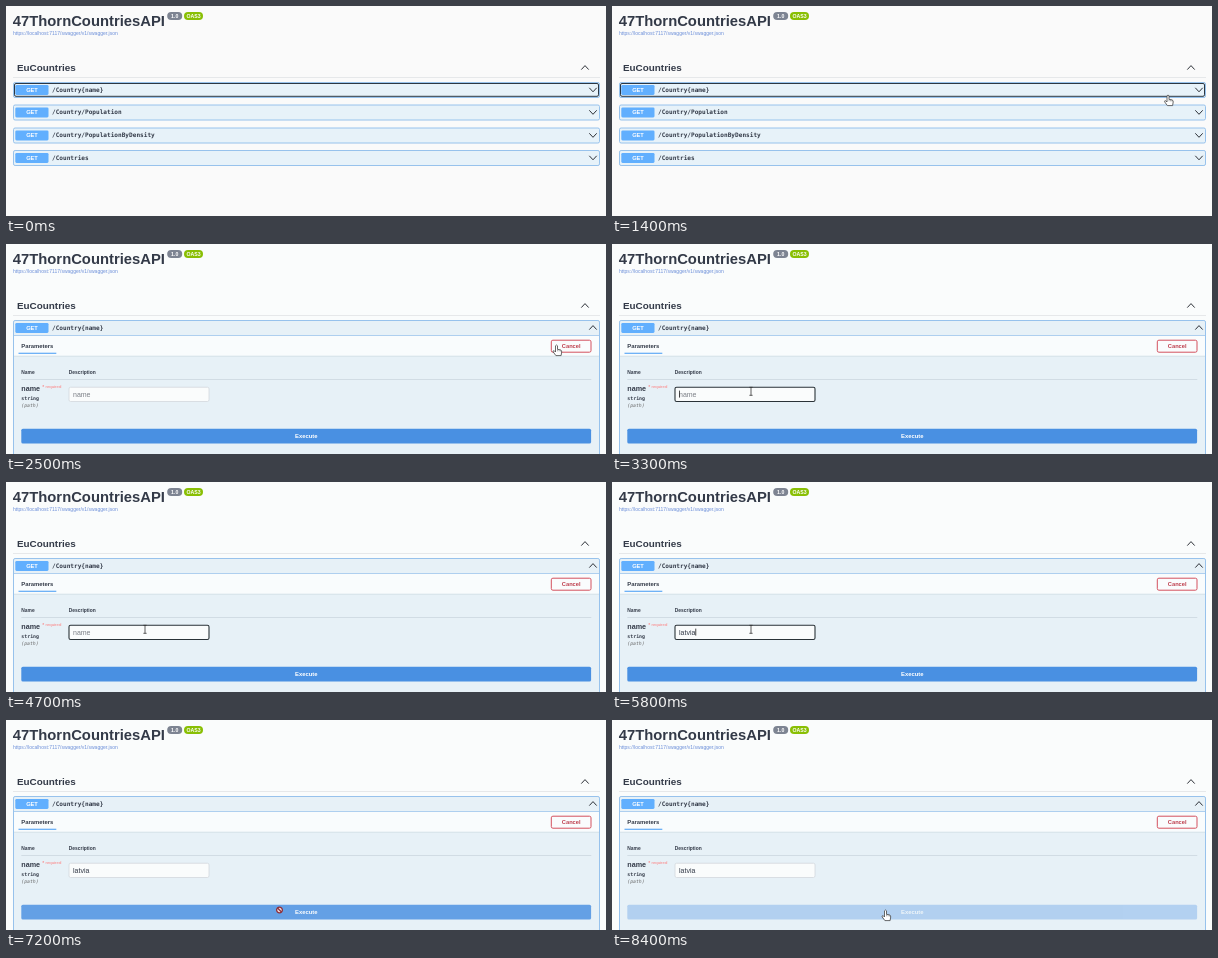
Animation of 600x210 px, one loop 8500 ms. Source, as an HTML page:

```html
<!DOCTYPE html>
<html lang="en">
<head>
<meta charset="utf-8">
<title>Countries API</title>
<style>
  html, body { margin: 0; width: 100%; height: 100%; overflow: hidden; background: #fafafa; }
  svg { display: block; width: 600px; height: 210px; }
  text { font-family: "Liberation Sans", Arial, sans-serif; fill: #333a48; white-space: pre; }
  .bold { font-weight: bold; }
  .mono { font-family: "DejaVu Sans Mono", monospace; }
  .mid { text-anchor: middle; }
  .white { fill: #fff; }
  .chevron { fill: none; stroke: #2d3138; stroke-width: 1; }
</style>
</head>
<body>
<svg id="stage" viewBox="0 0 600 210"></svg>
<script>
const LOOP = 8500, STEP = 100;
const stage = document.getElementById("stage");

const label = (x, y, size, text, cls = "bold", extra = "") =>
  `<text x="${x}" y="${y}" font-size="${size}" class="${cls}" ${extra}>${text}</text>`;
const box = (x, y, w, h, r, fill, stroke = "none", extra = "") =>
  `<rect x="${x}" y="${y}" width="${w}" height="${h}" rx="${r}" fill="${fill}" stroke="${stroke}" ${extra}/>`;
const chevron = (x, y, up) =>
  `<path class="chevron" d="M${x - 3.7} ${y + (up ? 2 : -2)}l3.7 ${up ? -4 : 4} 3.7 ${up ? 4 : -4}"/>`;
const group = (id, content) => `<g id="${id}">${content}</g>`;

const rowHead = (y, path) =>
  box(9.3, y + 2.9, 33.2, 10, 1.3, "#61affe") +
  label(26, y + 9.8, 5.7, "GET", "bold mid white") +
  label(46, y + 9.5, 6.1, path, "bold mono");
const row = (y, path) =>
  box(7.5, y + .5, 586, 15, 1.6, "#e7f2f9", "#97c2ec") +
  rowHead(y, path) + chevron(587, y + 7.8, false);
const sectionBar = (y, h) =>
  box(8, y, 585, h, 0, "#f9fcfd") +
  box(8, y + h, 585, .8, 0, "#d3dfe6");

const header =
  label(6.8, 20, 14.8, "47ThornCountriesAPI") +
  box(161.2, 6, 15, 8, 4, "#7d8492") +
  label(168.7, 12.1, 5.2, "1.0", "bold mid white") +
  box(178, 6, 19, 8, 4, "#89bf04") +
  label(187.5, 12.1, 5.2, "OAS3", "bold mid white") +
  label(7, 29.2, 5.02, "https://localhost:7117/swagger/v1/swagger.json", "", 'style="fill:#6c8fd9"') +
  label(11, 65.2, 9.9, "EuCountries") +
  chevron(579, 61.6, true) +
  box(7, 71.3, 587, .6, 0, "#d9dce0");

const collapsed =
  row(76, "/Country{name}") +
  row(98.5, "/Country/Population") +
  row(121.5, "/Country/PopulationByDensity") +
  row(144, "/Countries");

const expanded =
  box(7.5, 76.5, 586, 150, 1.6, "#e7f1f7", "#97c2ec") +
  rowHead(76, "/Country{name}") +
  chevron(587, 83.6, true) +
  box(8, 91.3, 585, .7, 0, "#97c2ec") +
  sectionBar(92, 19.8) +
  label(15.3, 104.2, 5.9, "Parameters") +
  box(12.5, 108.7, 37.8, 1.2, 0, "#61aaf5") +
  label(15.3, 129.8, 4.9, "Name") +
  label(62.8, 129.8, 4.9, "Description") +
  box(15.3, 135.3, 570, .6, 0, "#c3ced9") +
  label(15.3, 146.5, 7.2, "name") +
  label(36.3, 145.3, 5, "*", "", 'style="fill:#f66"') +
  label(39.5, 144.1, 4.3, "required", "", 'style="fill:#f77"') +
  label(15.3, 155.8, 4.9, "string", "bold mono") +
  label(15.3, 163, 4.8, "(path)", "mono", 'font-style="italic" style="fill:#666"') +
  box(63, 143.2, 140, 14.3, 1.6, "#fafcfc", "#d3d8dd", 'id="field"') +
  label(67, 152.9, 7, "", "", 'id="entry"') +
  box(67, 146.6, .8, 7, 0, "#222", "none", 'id="caret"');

const tryOut =
  box(540, 96.2, 45, 12, 1.6, "#fafcfd", "#555b66") +
  label(562.5, 104.2, 6.1, "Try it out", "bold mid") +
  sectionBar(193, 30) +
  label(15.3, 205.5, 5.9, "Responses");

const editing =
  box(545.3, 96.2, 39.7, 12, 1.6, "#fafcfd", "#d4505e") +
  label(565.2, 104.2, 5.7, "Cancel", "bold mid", 'style="fill:#bd3c4b"') +
  group("execute",
    box(15.3, 184.7, 569.8, 14.8, 1.6, "#4990e2") +
    label(300.3, 194.3, 5.9, "Execute", "bold mid white"));

// Each pointer is drawn with its hot spot at 0,0.
const pointers = {
  hand: '<path fill="#fff" stroke="#444" stroke-width=".8" stroke-linejoin="round" d="M-1 .8Q0-.8 1 .8V4.3L4 4.9Q5.4 5.3 5.2 7L4.6 10.6H-.6L-3.4 6.8Q-3.6 5.4-2.2 5.8L-1 7Z"/><path stroke="#666" stroke-width=".5" d="M1 4.3V6.3M2.6 4.7V6.4M4 5V6.5"/>',
  arrow: '<path fill="#fff" stroke="#222" stroke-width=".7" d="M0 0V8.6L2 6.8 3.3 9.8 4.6 9.2 3.3 6.3H6Z"/>',
  beam: '<path fill="none" stroke="#333" stroke-width=".8" d="M-1.6-4H1.6M0-4V4M-1.6 4H1.6"/>',
  ban: '<circle r="2.9" fill="#f3dede" stroke="#8c2f3b" stroke-width="1.3"/><path stroke="#8c2f3b" stroke-width="1.2" d="M-2-2L2 2"/>'
};

stage.innerHTML = box(0, 0, 600, 210, 0, "#fafafa", "none", 'id="page"') + header +
  group("collapsed", collapsed) + group("expanded", expanded) +
  group("tryOut", tryOut) + group("editing", editing) +
  box(8.5, 77.5, 584, 12.8, 1.5, "none", "#2b3743", 'id="focus"') +
  group("pointer", Object.entries(pointers).map(([id, art]) => group(id, art)).join(""));

const el = Object.fromEntries([...stage.querySelectorAll("[id]")].map(node => [node.id, node]));
const show = (node, on) => node.setAttribute("display", on ? "inline" : "none");
const clamp = v => Math.max(0, Math.min(1, v));
const ease = v => v * v * (3 - 2 * v);

// time, x, y of the pointer
const route = [
  [600, 572, -14], [1400, 556, 89], [1600, 553, 86.5], [1900, 553, 86.5],
  [2200, 550.5, 101], [2600, 550.5, 101], [3200, 139, 147.3],
  [6300, 139, 147.3], [6900, 273.5, 190], [LOOP, 273.5, 190]
];
const kinds = [
  [0, "arrow"], [1300, "hand"], [2000, "arrow"], [2100, "hand"], [2700, "arrow"],
  [3100, "beam"], [6400, "arrow"], [6900, "hand"], [7100, "ban"], [8400, "hand"]
];
const typed = [[0, ""], [5100, "l"], [5200, "la"], [5600, "lat"], [5700, "latv"], [5800, "latvia"]];
const CARET_X = { "": 67, l: 68.6, la: 72.6, lat: 74.5, latv: 78, latvia: 83.4 };

const latest = (list, t) => list.filter(([start]) => start <= t).pop()[1];

function pointerAt(t) {
  const next = Math.max(1, route.findIndex(([time]) => time >= t));
  const [t0, x0, y0] = route[next - 1], [t1, x1, y1] = route[next];
  const k = ease(clamp((t - t0) / (t1 - t0)));
  return [x0 + (x1 - x0) * k, y0 + (y1 - y0) * k];
}

function draw(now) {
  const t = Math.floor((now % LOOP) / STEP) * STEP;
  const open = t >= 1800, edit = t >= 2300;
  el.page.setAttribute("fill", open ? "#fafcfc" : "#fafafa");
  show(el.collapsed, !open);
  show(el.expanded, open);
  show(el.tryOut, open && !edit);
  show(el.editing, edit);
  show(el.focus, !edit);

  const active = t >= 3200 && t < 7000;
  el.field.setAttribute("stroke", active ? "#2b3338" : "#d3d8dd");
  el.field.setAttribute("stroke-width", active ? 1.1 : .8);

  const text = latest(typed, t);
  el.entry.textContent = text || "name";
  el.entry.style.fill = text ? "#333a48" : "#7b7f86";
  el.caret.setAttribute("x", CARET_X[text]);
  const blinkOn = t >= 5100 || Math.floor((t - 3200) / 500) % 2 === 0;
  show(el.caret, active && blinkOn);

  el.execute.setAttribute("opacity", 1 - .67 * ease(clamp((t - 7050) / 450)));

  const [x, y] = pointerAt(t);
  const kind = latest(kinds, t);
  el.pointer.setAttribute("transform", `translate(${x} ${y})`);
  Object.keys(pointers).forEach(id => show(el[id], id === kind));
}

const start = performance.now();
function tick() {
  draw(performance.now() - start);
  requestAnimationFrame(tick);
}
tick();
</script>
</body>
</html>
```
